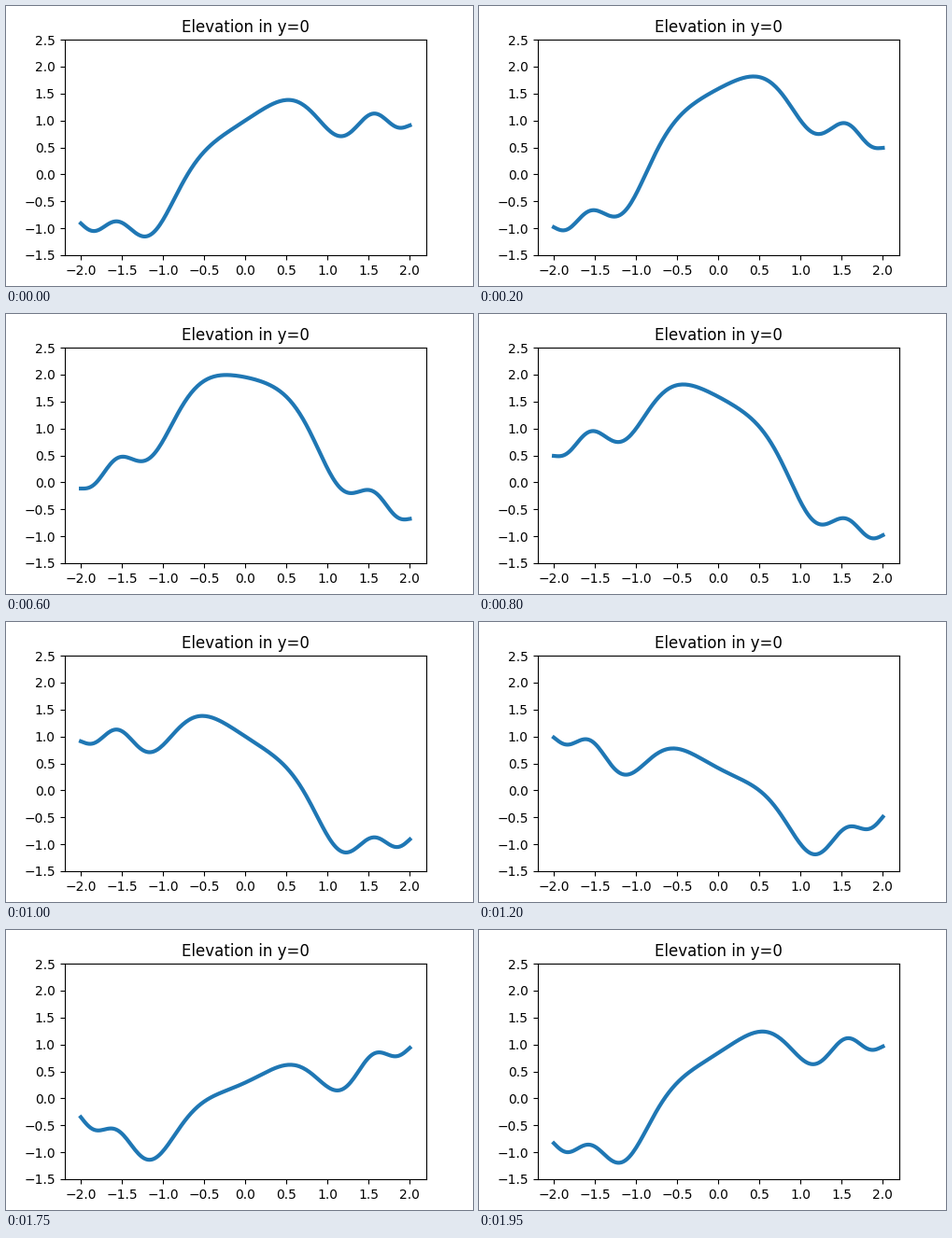
Animation, 500 px wide and 300 px high, one loop 2000 ms. Source, as a matplotlib script:

```python
import numpy as np
import matplotlib.pyplot as plt
from matplotlib.animation import FuncAnimation

FRAMES = 40
INTERVAL = 50  # ms

x = np.linspace(-2, 2, 201)


def elevation(x, phase):
    """Travelling sine wave over a fixed radial sinc bump, cut at y=0."""
    return np.sin(x + phase) + np.sinc(x**2)


fig, ax = plt.subplots(figsize=(5, 3), dpi=100)
line, = ax.plot(x, elevation(x, 0), lw=3)
ax.set_ylim(-1.5, 2.5)
ax.set_title("Elevation in y=0")


def update(frame):
    line.set_ydata(elevation(x, 2 * np.pi * frame / FRAMES))
    return line,


anim = FuncAnimation(fig, update, frames=FRAMES, interval=INTERVAL,
                     repeat=True, repeat_delay=0)

plt.show()
```
